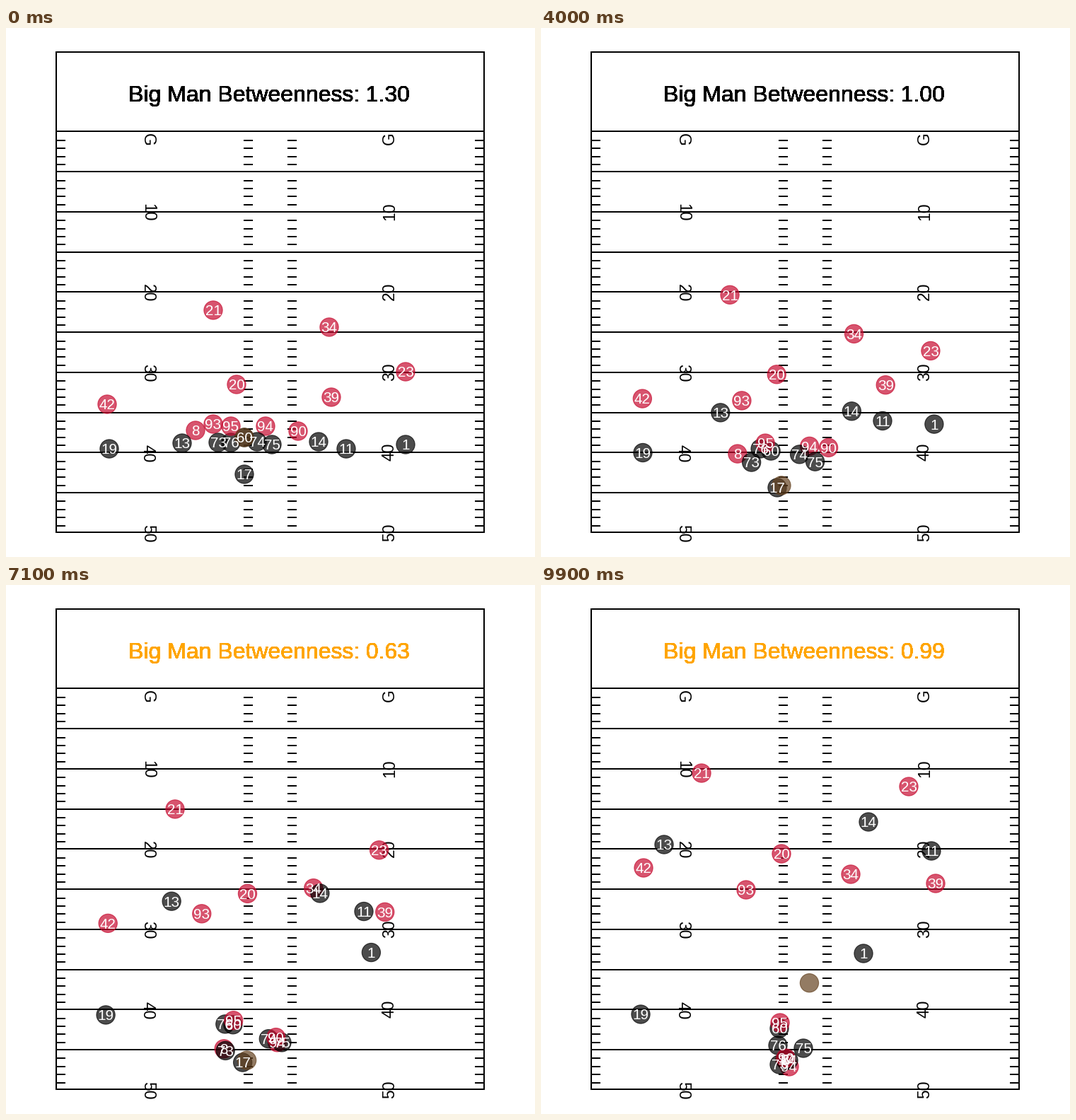
These frames come from a looping animation (748 px wide and 748 px high, 10 s). A matplotlib script:

```python
import numpy as np
import matplotlib.pyplot as plt
from matplotlib.animation import FuncAnimation
from matplotlib.patches import Circle, Rectangle

SIZE, DPI, FRAMES = 748, 100, 100
PT = 72 / DPI                      # points per pixel
RED, DARK, BROWN = "#c60c30", "#000000", "#654321"
LEFT, RIGHT, TOP, BOTTOM = 71, 676, 34, 713
GOAL, YARD = 146.45, 11.346
SNAP, CATCH, THROW = 12, 27, 87    # life of the ball, in frames
RUN, RAMP = 18, 12                 # players start running, time to reach speed

plt.rcParams["font.family"] = "Liberation Sans"
fig = plt.figure(figsize=(SIZE / DPI, SIZE / DPI), dpi=DPI, facecolor="white")
ax = fig.add_axes([0, 0, 1, 1])
ax.set(xlim=(0, SIZE), ylim=(SIZE, 0))
ax.axis("off")

time = np.arange(FRAMES)[:, None]
since = np.clip(time - RUN, 0, None)
gone = since - RAMP * (1 - np.exp(-since / RAMP))
progress = gone / gone[-1]


def draw_field():
    line = dict(colors="black", linewidth=2 * PT, zorder=1)
    ax.add_patch(Rectangle((LEFT, TOP), RIGHT - LEFT, BOTTOM - TOP,
                           fill=False, lw=2 * PT, ec="black", zorder=1))
    ax.hlines([GOAL + n * YARD for n in range(0, 50, 5)], LEFT, RIGHT, **line)
    ticks = [GOAL + n * YARD + 1.1 for n in range(50) if n % 5]
    for x in (LEFT, 336, 398, RIGHT - 13):
        ax.hlines(ticks, x, x + 13, **line)
    for n in range(0, 60, 10):
        text, y = (str(n), GOAL + n * YARD) if n else ("G", GOAL + 10.5)
        for x, dy, angle in ((194, 1, 270), (549, -1, 90)):
            ax.text(x, y + dy, text, size=22.9 * PT, rotation=angle, ha="center",
                    va="baseline", rotation_mode="anchor", zorder=2)


movers = []


def add_dot(color, path, label=""):
    dot = Circle(path[0], 13.1, fc=color, ec=color, lw=1.15 * PT,
                 alpha=0.7, zorder=3)
    ax.add_patch(dot)
    text = ax.text(0, 0, label, size=20.6 * PT, color="white", ha="center",
                   va="baseline", zorder=4)
    movers.append((dot, text, path))


def run(label, color, start, end, bend=(0, 0), drift=(0, 0)):
    """Drift before the snap, then run to the end on an arc bowed by bend."""
    lined_up = np.array(start) + np.multiply(drift, np.minimum(time / RUN, 1))
    path = (lined_up + (np.array(end) - lined_up) * progress
            + np.multiply(bend, 4 * progress * (1 - progress)))
    add_dot(color, path, label)
    return path


def ball_path(center, passer):
    """Snapped to the passer, held beside him, then thrown downfield."""
    hold = passer + (6, -3)
    s = np.clip((time - SNAP) / (CATCH - SNAP), 0, 1)
    path = center + (hold - center) * s
    flight = hold[THROW] + (time - THROW) * np.array((2.8, -9.2))
    return np.where(time < THROW, path, flight)


draw_field()

# Defence
run("21", RED, (293, 399), (227, 266), (-11, -5), drift=(-10, 5))
run("34", RED, (457, 423), (438, 409), (-8, 12), drift=(-8, 6))
run("23", RED, (565, 486), (520, 285), (-11, 9))
run("20", RED, (326, 504), (340, 380), (7, 4), drift=(1, 6))
run("39", RED, (460, 522), (558, 422), (18, 0))
run("42", RED, (143, 532), (145, 400), (0, 26))
run("8", RED, (268, 569), (345, 671), (-6, 27))
run("93", RED, (293, 560), (290, 431), (-15, -19))
run("94", RED, (367, 563), (351, 681), (27, 14))

# Receivers
run("19", DARK, (146, 595), (141, 607), (-2, 6))
run("13", DARK, (249, 587), (174, 367), (31, -9))
run("14", DARK, (442, 585), (463, 335), (-11, 0))
run("11", DARK, (481, 595), (552, 376), (-18, -3))
run("1", DARK, (565, 589), (456, 521), (17, -30))

# The pocket closing in on the passer
run("75", DARK, (376, 589), (371, 655), (16, 18), drift=(4, 3))
run("76", DARK, (318, 586), (335, 651), (-19, -4))
center = run("60", DARK, (337, 579), (337, 627), (-15, 13), drift=(-4, 4))
run("95", RED, (318, 563), (338, 619), (-9, 18), drift=(1, 5))
run("73", DARK, (300, 586), (337, 678), (-11, 17), drift=(-3, 3))
passer = run("17", DARK, (337, 631), (346, 671), (-8, 21))
run("74", DARK, (355, 585), (350, 672), (20, 5))
run("90", RED, (413, 570), (346, 669), (9, 11))

add_dot(BROWN, ball_path(center, passer))

# Stacked copies give the title its hard, heavy edges
titles = [ax.text(371.8, 104, "", size=32.05 * PT, ha="center", va="baseline")
          for _ in range(16)]


def update(i):
    for dot, text, path in movers:
        x, y = path[i]
        dot.center = x, y
        text.set_position((x, y + 7.4))
    tick = 2.5 * round(i / 2.5)    # the score updates in steps
    score = np.interp(tick, (0, 20, 40, 52.5, 70, 85, 100),
                      (1.30, 1.40, 1.00, 0.72, 0.63, 0.85, 0.99))
    for title in titles:
        title.set_text(f"Big Man Betweenness: {score:.2f}")
        title.set_color("orange" if round(score, 2) < 1 else "black")
    return []


anim = FuncAnimation(fig, update, frames=FRAMES, interval=100,
                     repeat=True, repeat_delay=0)
plt.show()
```
